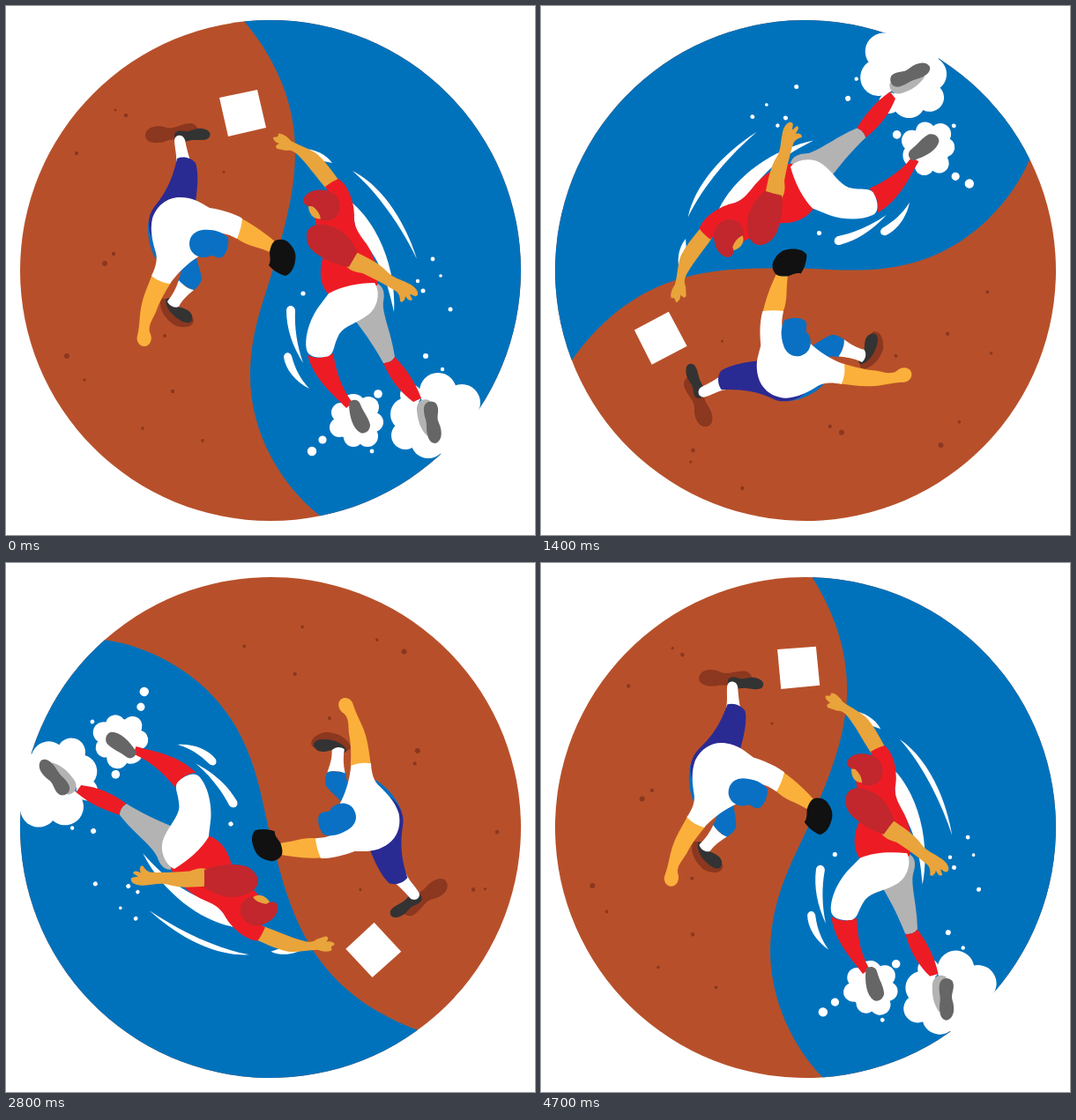
Animation, 600 px wide and 600 px high, one loop 4800 ms. Source, as an HTML page:

```html
<!DOCTYPE html>
<html lang="en">
<head>
<meta charset="utf-8">
<title>Stealing a base</title>
<style>
html, body { margin: 0; width: 100%; height: 100%; overflow: hidden; background: #fff; }
svg { display: block; width: 100vw; height: 100vh; }
.shadow { fill: #8c371f; }
.navy { fill: #2a2a93; }
.blue { fill: #0a70c3; }
.white { fill: #fff; }
.skin { fill: #fbb03b; }
.tan { fill: #e9a43b; }
.shoe { fill: #333; }
.red { fill: #ed1c24; }
.crimson { fill: #c1272d; }
.grey { fill: #b3b3b3; }
.sole { fill: #666; }
</style>
</head>
<body>
<svg viewBox="0 0 600 600">
<clipPath id="disc"><circle cx="300" cy="300" r="284"/></clipPath>
<g id="scene">
  <!-- ground -->
  <g clip-path="url(#disc)">
    <path fill="#b7502a" d="M0 0H600V600H0Z"/>
    <path fill="#0072bc" d="M269 16C302 55 328 105 328 165C328 215 314 255 304 295C292 335 277 370 277 420C277 485 313 545 357 579L600 600V0H269Z"/>
  </g>
  <g id="specks" class="shadow"></g>
  <path class="white" d="M242 104L285 95L295 138L252 148Z"/>

  <!-- fielder -->
  <path class="shadow" d="M158 147C158 137 172 134 182 138C192 140 198 133 210 133C220 135 221 148 212 151C200 154 190 150 182 153C172 157 158 156 158 147Z"/>
  <path class="shadow" d="M175 337C175 329 184 330 188 340C193 349 211 347 213 356C213 365 200 366 191 362C182 356 175 347 175 337Z"/>
  <path class="shoe" d="M191 147C191 141 198 141 203 142C210 143 214 138 222 139C230 140 233 144 231 148C229 153 220 152 213 152C207 152 204 155 198 154C193 153 191 151 191 147Z"/>
  <path class="shoe" d="M181 333C184 330 188 331 190 336C193 342 198 341 204 344C211 347 213 353 210 358C206 361 199 358 194 354C188 350 181 342 181 333Z"/>
  <path class="white" d="M191 152C192 145 201 145 203 152C205 162 207 170 210 178H193C194 168 191 160 191 152Z"/>
  <path class="blue" d="M162 242C159 258 163 275 170 287L186 262Z"/>
  <path class="navy" d="M194 173C201 170 210 172 215 178C219 190 217 208 215 222L190 245L165 262C160 250 161 237 168 228C180 213 188 200 194 173Z"/>
  <path class="blue" d="M198 290L215 282C217 292 221 300 222 310C220 316 216 320 212 323L195 312C198 305 200 300 198 290Z"/>
  <path class="white" d="M196 311C201 317 207 321 213 322C207 327 200 333 196 341C191 343 185 340 183 335C189 328 193 320 196 311Z"/>
  <path class="skin" d="M166 304L187 314C180 325 174 335 170 347C166 356 161 362 163 370C167 377 164 385 158 386C152 387 147 380 149 374C152 362 151 350 154 338C157 325 162 315 166 304Z"/>
  <path class="skin" d="M267 241C280 248 292 256 306 268L299 279C286 273 272 272 261 263Z"/>
  <path class="white" d="M166 241C171 226 183 217 197 217C213 217 220 223 231 229C244 231 258 235 268 241C267 250 265 257 262 264C256 261 250 258 244 258L220 283C207 291 195 302 186 315C178 314 171 311 165 306C170 296 172 288 170 280C166 267 163 254 166 241Z"/>
  <path class="blue" d="M223 254C237 253 247 257 252 263C253 273 250 281 245 285C240 287 237 283 232 283C222 289 208 282 208 270C208 261 214 255 223 254Z"/>
  <path fill="#111" d="M304 267C308 264 315 264 319 267C326 273 330 280 328 289C327 297 323 304 317 306C310 304 303 300 298 294C301 289 299 284 299 279C300 274 301 270 304 267Z"/>

  <!-- dust and speed lines -->
  <g id="dust" class="white"></g>
  <g class="white">
    <path d="M393 187C425 203 452 242 466 287C449 252 424 214 393 187Z"/>
    <path d="M333 162C348 161 362 167 370 178L350 174Z"/>
    <path d="M391 222C420 245 443 295 440 347C432 308 420 280 398 260Z"/>
    <path d="M318 345C319 338 327 339 328 345C327 365 330 385 337 405C325 386 318 366 318 345Z"/>
    <path d="M315 398C316 392 322 392 324 397C328 412 334 423 344 434C328 426 317 412 315 398Z"/>
  </g>

  <!-- runner -->
  <path class="grey" d="M414 315C425 312 431 322 428 335C426 348 437 370 441 398C438 403 433 405 428 405C420 390 408 372 397 358Z"/>
  <path class="red" d="M428 405C433 405 438 403 441 398C452 410 464 425 471 445L462 449C450 440 438 428 428 405Z"/>
  <path class="grey" d="M466 459C465 449 472 444 480 447L484 455L478 488C470 480 467 470 466 459Z"/>
  <path class="sole" d="M474 459C473 449 482 446 488 451C493 459 487 465 491 473C496 484 494 494 487 496C479 496 477 485 477 476C477 469 474 465 474 459Z"/>
  <path class="red" d="M342 396C352 401 363 399 371 394C374 410 378 430 393 450L386 456C372 441 350 425 342 396Z"/>
  <path class="sole" d="M389 450C393 445 400 446 402 452C405 460 411 466 413 475C413 482 407 486 402 484C394 480 389 466 389 450Z"/>
  <path class="tan" d="M303 149C306 148 309 150 309 145C313 144 319 148 323 153C334 159 345 162 353 168C362 176 369 186 377 197L363 207C352 194 342 180 334 172C328 165 323 163 318 164L308 162C304 160 307 157 310 156C306 155 303 152 303 149Z"/>
  <path class="red" d="M362 205C367 201 372 198 377 196C388 203 395 222 395 238C394 250 400 258 409 270C417 282 424 300 421 317L366 327C355 316 355 298 360 284L350 240L368 215Z"/>
  <path class="white" d="M366 326C380 318 400 314 418 314C425 324 422 342 411 350C400 359 385 362 378 372C371 385 373 393 366 397C356 400 343 399 341 390C338 375 345 355 354 342Z"/>
  <path class="tan" d="M395 278C411 286 424 292 433 302C440 309 448 310 455 314C463 317 468 323 467 327C465 332 461 327 458 327L461 333C458 336 455 332 453 329C453 333 450 337 447 335C447 330 446 327 443 324C432 317 415 308 404 303C396 302 390 300 386 295Z"/>
  <path class="crimson" d="M341 262C340 250 352 245 366 249C380 252 392 264 399 279C395 285 392 291 389 296C375 294 362 288 352 281C345 276 341 270 341 262Z"/>
  <path class="tan" d="M343 226L354 224L358 241C350 243 343 237 343 226Z"/>
  <path class="crimson" d="M337 220C340 211 350 207 362 209C374 210 381 222 378 233C375 242 366 245 357 243C357 236 352 230 347 227C342 228 337 225 337 220Z"/>
</g>
</svg>
<script>
const scene = document.getElementById('scene');

function addDots(id, dots) {
  document.getElementById(id).innerHTML =
    dots.map(([x, y, r]) => `<circle cx="${x}" cy="${y}" r="${r}"/>`).join('');
}

addDots('specks', [
  [136, 124, 2.3], [124, 118, 1.6], [80, 167, 2.2], [247, 188, 1.6],
  [122, 281, 2.2], [112, 292, 3], [69, 397, 3], [180, 374, 2],
  [89, 424, 1.8], [189, 437, 2.2], [155, 479, 1.8], [223, 493, 1.9]
]);

addDots('dust', [
  // small cloud
  [396, 472, 22], [380, 461, 11], [394, 454, 14], [411, 455, 12],
  [417, 472, 11], [410, 488, 12], [394, 489, 11], [378, 478, 11],
  // large cloud
  [495, 473, 35], [455, 463, 19], [459, 441, 12], [490, 437, 21],
  [517, 450, 21], [453, 487, 16], [479, 493, 20], [520, 485, 30],
  // loose puffs
  [422, 440, 4.8], [476, 397, 3], [495, 412, 2.2], [504, 344, 2.5],
  [473, 323, 2.5], [467, 312, 2.2], [484, 287, 2.4], [493, 306, 1.8],
  [337, 326, 2.6], [359, 492, 4.6], [347, 505, 5.2], [415, 505, 2.4]
]);

// One full turn in 48 even steps.
function draw() {
  const step = Math.floor(performance.now() / 100) % 48;
  scene.setAttribute('transform', `rotate(${-7.5 * step} 300 300)`);
  requestAnimationFrame(draw);
}
draw();
</script>
</body>
</html>
```
